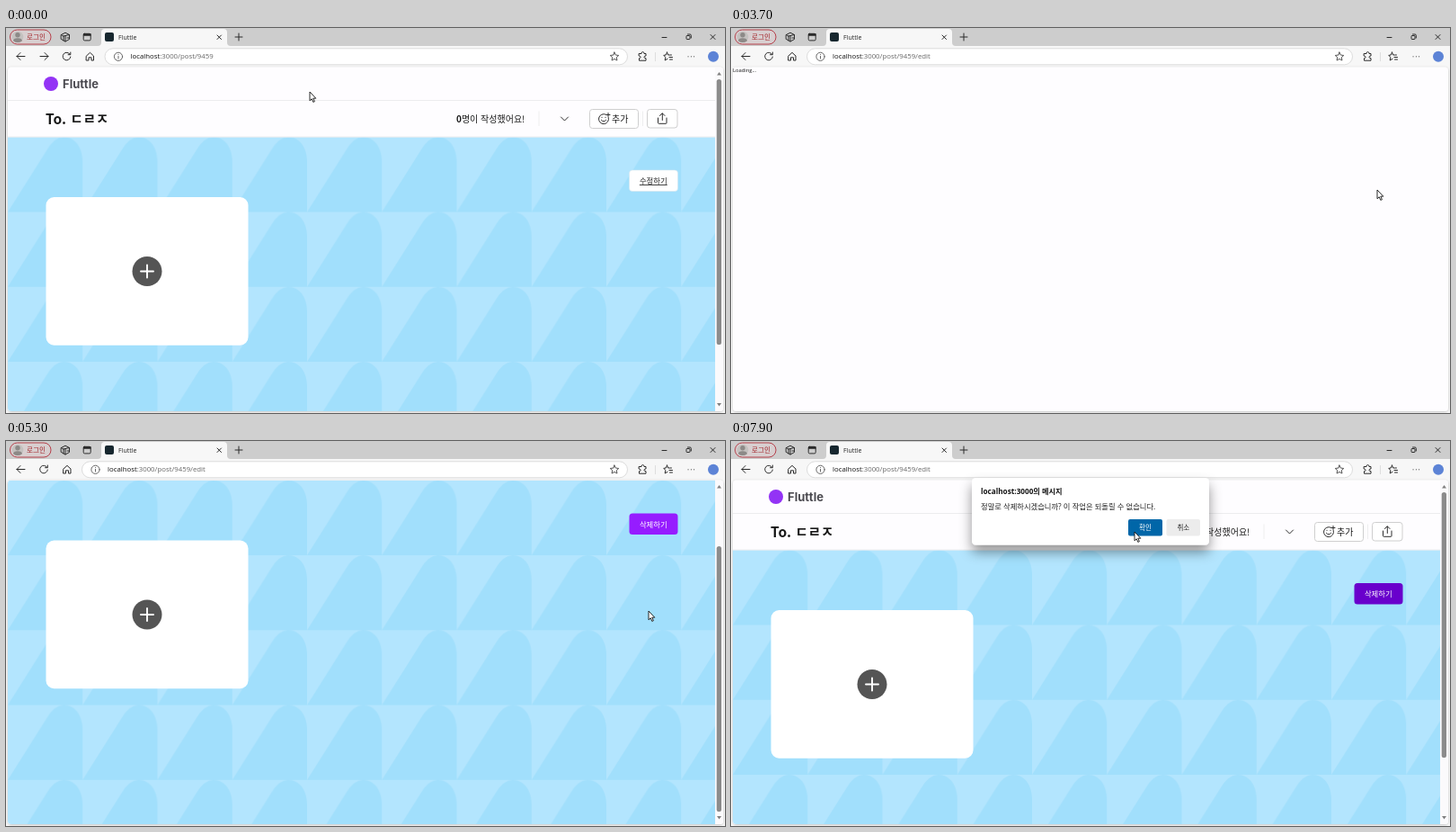
Write an HTML page that moves like this. It is 800 px wide and 428 px high and loops after 8 s.

```html
<!DOCTYPE html>
<html lang="ko">
<head>
<meta charset="utf-8">
<title>Fluttle</title>
<style>
html, body { margin: 0; width: 100%; height: 100%; overflow: hidden; background: #f7f7f7; }
svg { display: block; width: 800px; height: 428px; }
text { font-family: "Noto Sans CJK KR", "Noto Sans CJK", sans-serif; white-space: pre; }
.ui { font-family: "Open Sans", "Noto Sans CJK KR", sans-serif; }
.brand { font: 700 13px Inter, sans-serif; }
.line { fill: none; stroke: #2b2b2b; stroke-width: 1; stroke-linecap: round; stroke-linejoin: round; }
.mid { text-anchor: middle; }
</style>
</head>
<body>
<svg viewBox="0 0 800 428" xmlns="http://www.w3.org/2000/svg">
  <defs>
    <pattern id="arches" x="2" y="121.3" width="83.25" height="83.25" patternUnits="userSpaceOnUse">
      <rect width="84" height="84" fill="#b3e5fe"/>
      <path d="M0 83.25L43 15Q52 0 62 0C76 0 83.25 13 83.25 27V83.25Z" fill="#a1dffc"/>
    </pattern>
    <clipPath id="view"><rect x="2" y="43.5" width="796" height="382.5" rx="4"/></clipPath>
    <filter id="pageShadow"><feDropShadow dx="0" dy=".6" stdDeviation=".9" flood-opacity=".25"/></filter>
    <filter id="dialogShadow" x="-20%" y="-30%" width="140%" height="190%">
      <feDropShadow dx="0" dy="8" stdDeviation="7" flood-opacity=".42"/>
    </filter>
  </defs>

  <!-- tab strip -->
  <rect width="800" height="428" fill="#f7f7f7"/>
  <rect width="800" height="20" fill="#cdcdcd"/>
  <path d="M102 20Q106 20 106 16V5Q106 1 110 1H242Q246 1 246 5V16Q246 20 250 20Z" fill="#f7f7f7"/>
  <rect x="4.5" y="2" width="45.5" height="16" rx="8" fill="#d8cfd0" stroke="#b5404b"/>
  <circle cx="13" cy="10" r="6.3" fill="#c4c1bf"/>
  <circle cx="13" cy="7.8" r="2.7" fill="#8c8987"/>
  <path d="M8 14.2Q8.3 11.3 13 11.3T18 14.2Q13 18 8 14.2Z" fill="#8c8987"/>
  <text x="23" y="12.6" font-size="7.6" fill="#a4262c">로그인</text>
  <path class="line" d="M61.5 7.5L66 5.2L70.5 7.5V12.5L66 15L61.5 12.5ZM61.5 7.5L64 9V14M64 9L70.5 7.5M66 8.5V15M68 11H70" stroke-width=".9"/>
  <rect x="86.2" y="6.3" width="8" height="7.6" rx="1.3" class="line"/>
  <path d="M86 6H94.500V8.800H86Z" fill="#2b2b2b"/>
  <rect x="110" y="5" width="10" height="10" rx="2" fill="#17272f"/>
  <text class="ui" x="125" y="12.6" font-size="7" fill="#222">Fluttle</text>
  <path class="line" d="M235 8L239.500 12.500M239.500 8L235 12.500M255 10H263M259 6V14M730 10.500H735"/>
  <path class="line" d="M757 9Q757 8.500 757.500 8.500H760.500Q761 8.500 761 9V12Q761 12.500 760.500 12.500H757.500Q757 12.500 757 12ZM758.500 7H761Q762.300 7 762.300 8.300V11M784 7.500L789 12.500M789 7.500L784 12.500" stroke-width=".8"/>

  <!-- toolbar -->
  <path class="line" d="M12 31.500H21M16 27.500L12 31.500L16 35.500"/>
  <path id="forward" class="line" d="M38 31.500H47M43 27.500L47 31.500L43 35.500"/>
  <g id="navIcons">
    <path class="line" d="M45.700 29.300A4.300 4.300 0 1 0 46.300 32M46.300 27V29.700H43.600M64 31L68 27.300L72 31V36H69.500V32.800H66.500V36H64Z"/>
  </g>
  <rect id="addressBar" y="22.800" height="18" rx="9" fill="#fff" stroke="#dcdcdc"/>
  <g id="address">
    <circle class="line" cx="99.500" cy="31.800" r="4.600" stroke-width=".8" style="stroke:#666"/>
    <path class="line" d="M99.500 31.300V34M99.500 29.500V29.600" style="stroke:#666"/>
    <text class="ui" x="113" y="34.300" font-size="7.800" fill="#666"><tspan fill="#111">localhost</tspan><tspan id="path"></tspan></text>
  </g>
  <path id="star" class="line" stroke-width=".8" style="stroke:#555"/>
  <path class="line" d="M704.500 28.500H707Q707 26.500 708.500 26.500T710 28.500H712V31Q710 31 710 32.300T712 33.600V36.200H704.500V33.600Q706.200 33.400 706.200 32.300T704.500 31Z"/>
  <path d="M722.500 27V37" stroke="#ddd"/>
  <path class="line" d="M735.500 27L736.700 30H740.500M735.500 27L734.300 30L731.800 30.300L733.800 32.600L733.200 36L736 34.300M738 32.500H741.500M738.500 35H741.500"/>
  <path class="line" d="M759 31.800H759.100M762.300 31.800H762.400M765.600 31.800H765.700" stroke-width="1.300"/>
  <circle cx="787" cy="31.800" r="6" fill="#5c83d6"/>

  <rect x="2" y="43.500" width="796" height="382.500" rx="4" fill="#fefdff" filter="url(#pageShadow)"/>
  <text id="loading" class="ui" x="2" y="49.300" font-size="5.800" fill="#111">Loading...</text>

  <g id="page" clip-path="url(#view)">
    <g id="content">
      <rect x="2" y="121.300" width="787" height="384" fill="url(#arches)"/>
      <path d="M2 80.500H789M2 121H789" stroke="#ececee"/>
      <circle cx="50" cy="62" r="8" fill="#9333f5"/>
      <text class="brand" x="63" y="67" fill="#4a494f">Fluttle</text>
      <text x="44" y="106.700" font-size="15.500" font-weight="700" fill="#181818">To. ㄷㄹㅈ</text>
      <text x="501" y="104.600" font-size="10" fill="#181818"><tspan font-weight="700">0</tspan>명이 작성했어요!</text>
      <path d="M593 92.500V109M708.500 92.500V109" stroke="#eee"/>
      <path class="line" d="M617.500 99L621.500 103L625.500 99" stroke-width="1.200"/>
      <g fill="#fff" stroke="#cfcfcf">
        <rect x="649.500" y="90.500" width="54" height="21" rx="3"/>
        <rect x="713.500" y="90.500" width="33.500" height="20.500" rx="3"/>
      </g>
      <path class="line" d="M667.500 96.200A5.500 5.500 0 1 0 670.300 99.500M662.300 102.200Q665 105.700 667.700 102.200M663 99.200V99.500M667 99.200V99.500M670 94.500V98.500M668 96.500H672"/>
      <text x="674" y="104.600" font-size="10" font-weight="500" fill="#181818">추가</text>
      <path class="line" d="M725.500 100V105.500Q725.500 106.300 726.300 106.300H734.200Q735 106.300 735 105.500V100M730.300 102.500V95M727.500 97.500L730.300 94.800L733 97.500"/>
      <rect id="button" x="693.500" y="158" width="54" height="23.500" rx="3.500"/>
      <text id="buttonLabel" class="mid" x="720.300" y="173" font-size="8.400"></text>
      <rect x="44.500" y="188" width="225" height="164.700" rx="9" fill="#fff"/>
      <circle cx="157" cy="270.500" r="16.500" fill="#555"/>
      <path d="M150 270.500H164M157 263.500V277.500" stroke="#fff" stroke-width="1.900" stroke-linecap="round"/>
    </g>
    <rect x="789" y="43" width="9" height="384" fill="#fbfafc"/>
    <rect id="thumb" x="790.700" width="5.300" height="295" rx="2.600" fill="#8b8b8b"/>
    <path d="M791 52.500L793.500 49L796 52.500ZM791 417L793.500 420.500L796 417Z" fill="#808080"/>
  </g>

  <g id="dialog">
    <rect x="268" y="41" width="264" height="74.500" rx="4.500" fill="#fff" filter="url(#dialogShadow)"/>
    <text class="ui" x="278" y="59" font-size="8.200" font-weight="700" fill="#151515">localhost:3000의 메시지</text>
    <text class="ui" x="278" y="75.500" font-size="8.300" fill="#222">정말로 삭제하시겠습니까? 이 작업은 되돌릴 수 없습니다.</text>
    <rect id="confirm" x="442" y="87" width="38" height="18.500" rx="2"/>
    <rect x="484.500" y="87" width="37.500" height="18.500" rx="2" fill="#ececec"/>
    <text class="mid" x="461" y="98.900" font-size="7.500" fill="#fff">확인</text>
    <text class="mid" x="503.300" y="98.900" font-size="7.500" fill="#222">취소</text>
  </g>

  <g id="cursor" fill="#fff" stroke="#111" stroke-width=".9" stroke-linejoin="round">
    <path id="arrow" d="M0 0V9.800L2.200 7.800L3.800 11.400L5.400 10.700L3.800 7.200H6.800Z"/>
    <path id="hand" d="M-1 1.200Q-1 0 0 0T1 1.200V4.500Q2.500 3.800 2.900 5Q4.400 4.300 4.800 5.500Q6.500 5.100 6.500 6.700V9Q6.500 11 5.300 13H-.300Q-1 11-3.200 8.300Q-4 7-2.900 6.600Q-2 6.500-1 8Z"/>
  </g>
</svg>
<script>
const LOOP = 8000, STEP = 100;
const LOADING_AT = 3400, LOADED_AT = 4000, PRESSED_AT = 6400, DIALOG_AT = 6600;
const SCROLL = 77.5, THUMB_TRAVEL = 60;

const cursorKeys = [
  [0, 338, 71], [200, 338, 71], [1500, 656, 233], [2000, 656, 233], [2800, 719, 174],
  [3300, 719, 174], [3600, 719, 180], [3800, 719, 180], [4200, 723, 180], [4500, 723, 180],
  [5000, 715, 189], [6000, 715, 189], [6300, 717, 174], [6800, 717, 174],
  [7600, 449, 101], [LOOP, 449, 101]
];
const scrollKeys = [[0, 0], [4800, 0], [5200, SCROLL], [5700, SCROLL], [6100, 0], [LOOP, 0]];

const el = id => document.getElementById(id);
const set = (id, attrs) => Object.entries(attrs).forEach(([name, value]) => el(id).setAttribute(name, value));
const show = (id, visible) => { el(id).style.display = visible ? "" : "none"; };
const shift = (id, x, y) => set(id, { transform: `translate(${x} ${y})` });

function sample(keys, t) {
  const next = keys.findIndex(key => key[0] > t);
  const [a, b] = [keys[next - 1], keys[next]];
  const u = (t - a[0]) / (b[0] - a[0]);
  const eased = u * u * (3 - 2 * u);
  return a.slice(1).map((value, i) => value + (b[i + 1] - value) * eased);
}

function starPath(cx, cy) {
  const points = Array.from({ length: 10 }, (_, i) => {
    const radius = i % 2 ? 2.4 : 5, angle = i * Math.PI / 5 - Math.PI / 2;
    return `${cx + radius * Math.cos(angle)} ${cy + radius * Math.sin(angle)}`;
  });
  return `M${points.join("L")}Z`;
}

function buttonFill(editing, pressed, hover) {
  if (!editing) return "#fff";
  if (pressed) return "#6900cc";
  return hover ? "#7f00e2" : "#961cff";
}

function render(t) {
  const editing = t >= LOADING_AT;
  const loading = editing && t < LOADED_AT;
  const dialogOpen = t >= DIALOG_AT;
  const [x, y] = sample(cursorKeys, t);
  const [scroll] = sample(scrollKeys, t);
  const inside = (left, top, right, bottom) => x > left && x < right && y > top && y < bottom;
  const hover = !loading && inside(693, 158 - scroll, 748, 182 - scroll);

  const navShift = editing ? 0 : 25.5;
  show("forward", !editing);
  shift("navIcons", navShift, 0);
  shift("address", navShift, 0);
  set("addressBar", { x: 84.5 + navShift, width: 607 - navShift });
  el("path").textContent = ":3000/post/9459" + (editing ? "/edit" : "");

  show("loading", loading);
  show("page", !loading);
  shift("content", 0, -scroll);
  set("thumb", { y: 57 + scroll / SCROLL * THUMB_TRAVEL });

  set("button", {
    fill: buttonFill(editing, t >= PRESSED_AT, hover),
    stroke: editing ? "none" : "#d5e6ef",
    "stroke-width": .6
  });
  set("buttonLabel", { fill: editing ? "#fff" : "#222", "text-decoration": editing ? "none" : "underline" });
  el("buttonLabel").textContent = editing ? "삭제하기" : "수정하기";

  show("dialog", dialogOpen);
  shift("dialog", 0, t < DIALOG_AT + STEP ? -2 : 0);
  set("confirm", { fill: inside(442, 87, 480, 105.5) ? "#0066a8" : "#0b7bd0" });

  const pointing = hover && t < DIALOG_AT + 2 * STEP;
  shift("cursor", x, y);
  show("arrow", !pointing);
  show("hand", pointing);
}

set("star", { d: starPath(677, 32) });
const start = performance.now();
function tick() {
  const t = (performance.now() - start) % LOOP;
  render(Math.floor(t / STEP) * STEP);
  requestAnimationFrame(tick);
}
tick();
</script>
</body>
</html>
```
